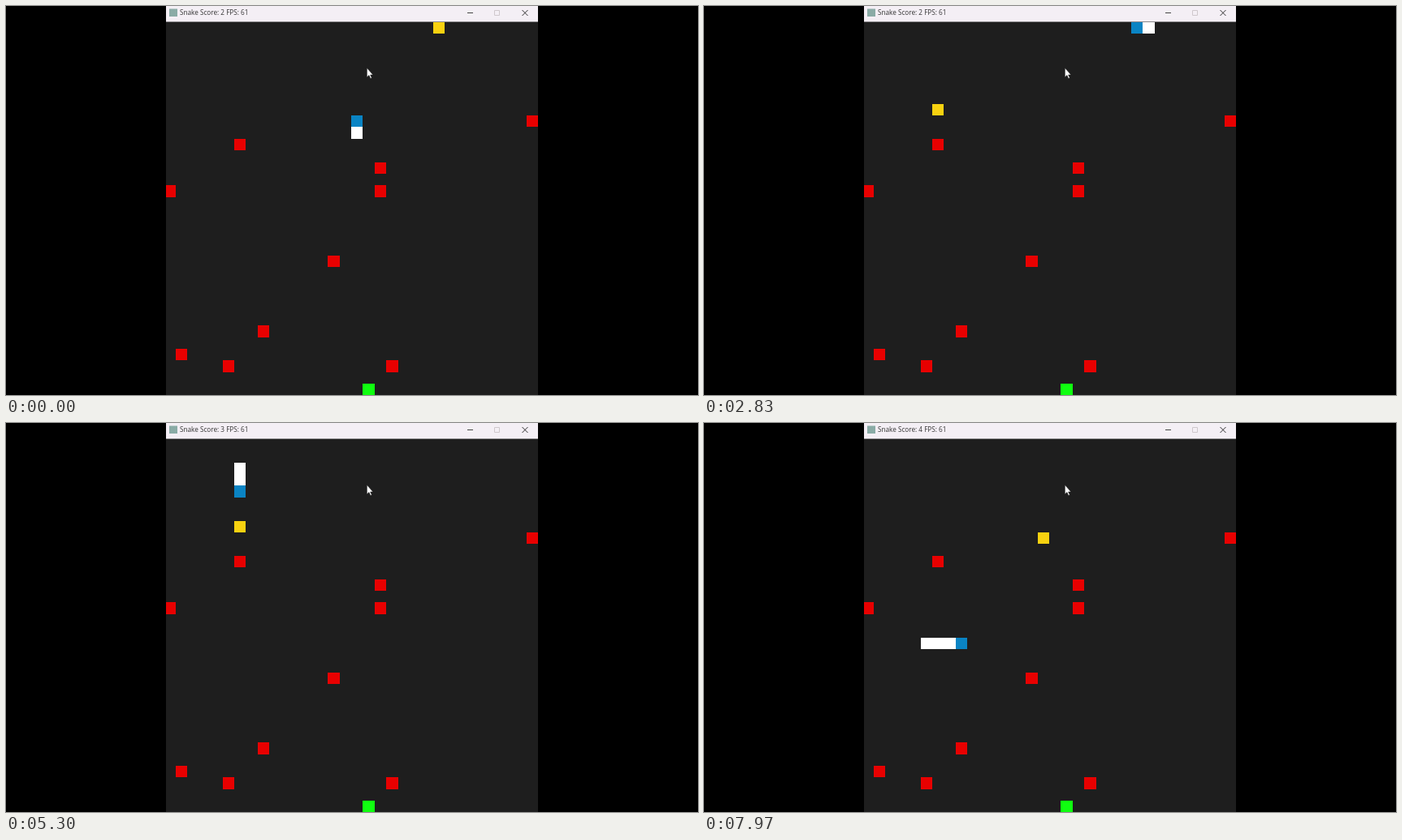
These frames come from a looping animation (852 by 480 pixels, 8000 ms). An HTML page with a canvas:

```html
<!DOCTYPE html>
<html>
<head>
<meta charset="utf-8">
<style>
html, body { margin: 0; width: 100%; height: 100%; overflow: hidden; background: #000; }
canvas { display: block; }
</style>
</head>
<body>
<canvas id="stage" width="852" height="480"></canvas>
<script>
const ctx = document.getElementById('stage').getContext('2d');
const LOOP = 8000, CELL = 14.4, LEFT = 194.6, TOP = 19.8;
const FIRST_TICK = 95, TICK = 182, SPEED_UP = 0.66;

const route = 'U3 R6 U4 R4 U1 L20 D5 R6 D2 L9 D10 R5';
const headings = { U: [0, -1], D: [0, 1], L: [-1, 0], R: [1, 0] };
const foods = [[23, 0], [6, 7], [15, 8]];
const walls = [[31, 8], [6, 10], [18, 12], [18, 14], [0, 14],
  [14, 20], [8, 26], [1, 28], [5, 29], [19, 29]];
const cursor = new Path2D('M444.3 76.3V88L446.9 85.6L448.7 89.6L450.4 88.8L448.7 85H452Z');

// The snake moves on every tick and once more, between ticks, when it turns.
// Each meal shortens the tick.
function walk() {
  const steps = [{ x: 16, y: 9, t: -TICK }, { x: 16, y: 8, t: 0 }];
  const meals = [];
  let [x, y, tick, interval] = [16, 8, FIRST_TICK - TICK, TICK];
  route.split(' ').forEach((leg, legIndex) => {
    const [dx, dy] = headings[leg[0]];
    for (let i = 0; i < +leg.slice(1); i++) {
      const turning = legIndex > 0 && i === 0;
      if (!turning) tick += interval;
      x += dx;
      y += dy;
      steps.push({ x, y, t: turning ? tick + interval / 2 : tick });
      const [foodX, foodY] = foods[meals.length];
      if (x === foodX && y === foodY) {
        meals.push(steps.length - 1);
        interval *= SPEED_UP;
      }
    }
  });
  return { steps, meals };
}

const { steps, meals } = walk();

function rect(color, x, y, w, h) {
  ctx.fillStyle = color;
  ctx.fillRect(x, y, w, h);
}

function cell(color, x, y) {
  const left = Math.round(LEFT + x * CELL), right = Math.round(LEFT + (x + 1) * CELL);
  const top = Math.round(TOP + y * CELL), bottom = Math.round(TOP + (y + 1) * CELL);
  rect(color, left, top, right - left, bottom - top);
}

function stroke(color, path) {
  ctx.strokeStyle = color;
  ctx.lineWidth = 1;
  ctx.stroke(new Path2D(path));
}

function drawTitleBar(score) {
  rect('#f4eff5', 197, 0, 458, 19.5);
  rect('#8aaba6', 201, 3.5, 10, 9.5);
  ctx.fillStyle = '#333';
  ctx.font = '8.2px "Open Sans", sans-serif';
  ctx.fillText(`Snake Score: ${score} FPS: 61`, 214, 11.3);
  stroke('#444', 'M568 8.5H575');
  stroke('#cfc8cc', 'M601.5 5.5h6v6h-6Z');
  stroke('#333', 'M635.5 5l7 7M642.5 5l-7 7');
}

function drawCursor() {
  ctx.fillStyle = '#fff';
  ctx.strokeStyle = '#111';
  ctx.lineWidth = 0.6;
  ctx.fill(cursor);
  ctx.stroke(cursor);
}

function draw(t) {
  const head = steps.filter(s => s.t <= t).length - 1;
  const eaten = meals.filter(m => head >= m).length;
  const length = 2 + meals.filter(m => head > m).length;
  const score = 2 + meals.filter(m => t >= steps[m].t + 40).length;

  rect('#000', 0, 0, 852, 480);
  ctx.save();
  ctx.beginPath();
  ctx.rect(197, 0, 458, 480);
  ctx.clip();
  rect('#1e1e1e', 197, 0, 458, 480);
  walls.forEach(w => cell('#e80000', ...w));
  cell('#10ff10', 17, 31);
  cell('#f8d210', ...foods[eaten]);
  steps.slice(head - length + 1, head).forEach(s => cell('#fff', s.x, s.y));
  cell('#0a84c4', steps[head].x, steps[head].y);
  drawTitleBar(score);
  drawCursor();
  ctx.restore();
}

function tick() {
  draw(performance.now() % LOOP);
  requestAnimationFrame(tick);
}
tick();
</script>
</body>
</html>
```
